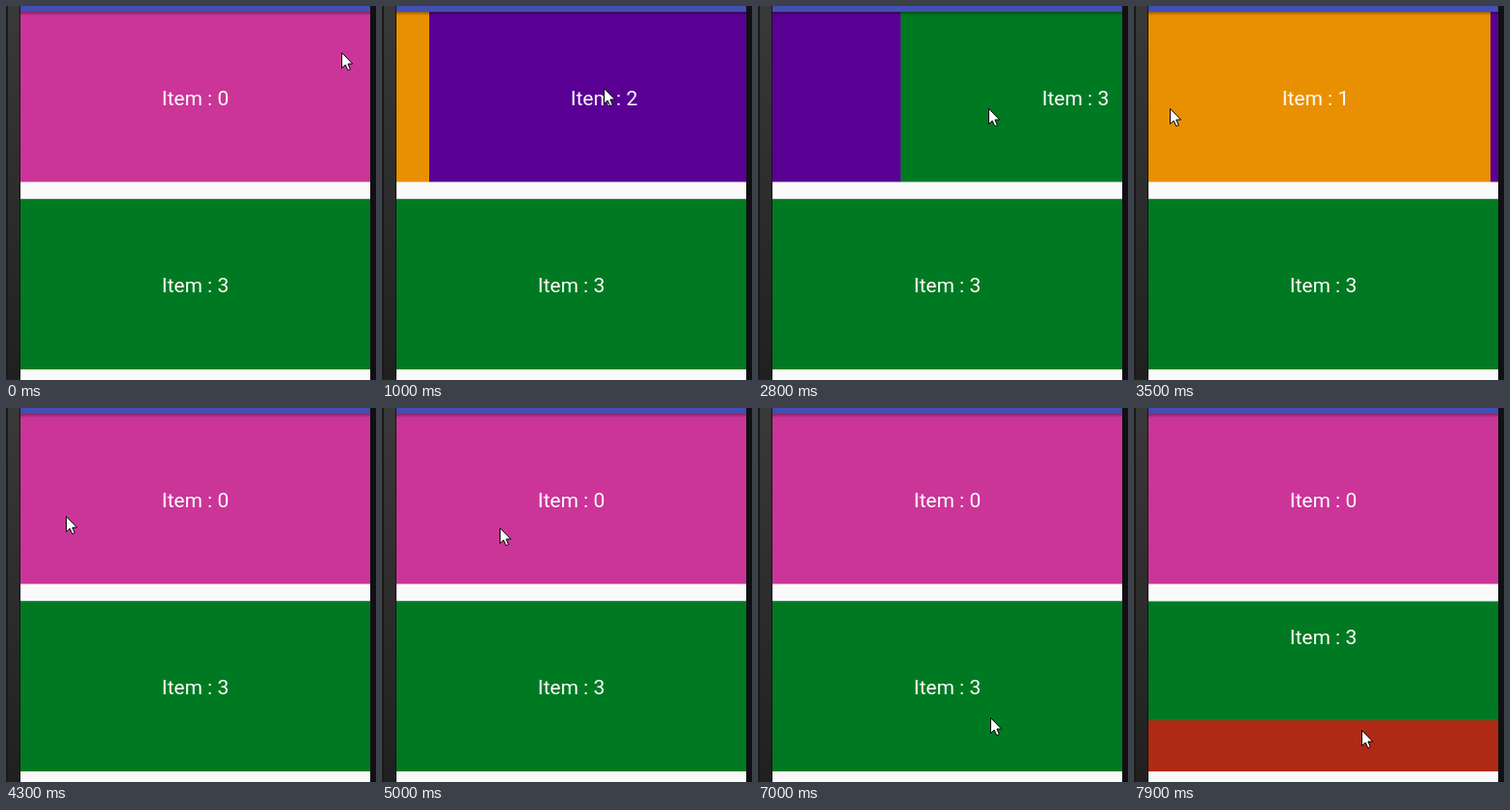
An HTML page with a canvas for the animation above (8 s loop, 384 by 388 pixels).

```html
<!DOCTYPE html>
<html lang="en">
<head>
<meta charset="utf-8">
<title>Pager demo</title>
<style>
html, body { margin: 0; width: 100%; height: 100%; overflow: hidden; background: #fafafa; }
canvas { display: block; }
</style>
</head>
<body>
<canvas id="stage" width="384" height="388"></canvas>
<script>
const ctx = document.getElementById('stage').getContext('2d');
const LOOP = 8000, STEP = 100;
const LEFT = 15, WIDTH = 363, HEIGHT = 176.5;
const DRAG = 200, SETTLE = 300;
const COLORS = ['#cb3598', '#e99002', '#5a0094', '#007a22', '#b02a15'];

// A gesture drags the cursor between two points and turns a page by dir
const gesture = (at, dir, from, to) => ({ at, dir, from, to });
const repeat = make => Array.from({ length: 4 }, (_, i) => make(i));
const swipeX = (at, dir, y) => gesture(at, dir, [174 + 138 * dir, y], [174 - 138 * dir, y]);
const swipeY = (at, dir, x) => gesture(at, dir, [x, 272 + 75 * dir], [x, 272 - 85 * dir]);

const topSwipes = [
  ...repeat(i => swipeX(270 + 402 * i, 1, 72 + 13 * i)),
  ...repeat(i => swipeX(2200 + 453 * i, -1, 106))
];
const bottomSwipes = repeat(i => swipeY(5807 + 615 * i, i % 2 ? -1 : 1, 248 - 4 * i));
const gestures = [
  gesture(-2 * DRAG, 0, [348, 48], [348, 48]),
  ...topSwipes,
  gesture(4990, 0, [116, 124], [245, 126]),
  ...bottomSwipes
];

const mix = (a, b, k) => a.map((v, i) => Math.round(v + (b[i] - v) * k));
const smooth = k => k * k * (3 - 2 * k);

// The finger drags half a page, then the page eases into place
function turned(age) {
  if (age <= 0) return 0;
  if (age < DRAG) return age / DRAG / 2;
  return 1 - 0.5 * Math.max(0, 1 - (age - DRAG) / SETTLE) ** 3;
}

function pageAt(start, swipes, t) {
  return swipes.reduce((page, { at, dir }) => page + dir * turned(t - at), start);
}

// Drag, swing back to the start point, then glide to the next gesture
function cursorAt(t) {
  const i = gestures.findLastIndex(g => g.at <= t);
  const { at, from, to } = gestures[i], next = gestures[i + 1];
  const age = t - at;
  if (age < DRAG) return mix(from, to, age / DRAG);
  if (age < 2 * DRAG || !next) return mix(to, from, smooth(age / DRAG - 1));
  return mix(from, next.from, (age - 2 * DRAG) / (next.at - at - 2 * DRAG));
}

function rect(fill, x, y, w, h) {
  ctx.fillStyle = fill;
  ctx.fillRect(x, y, w, h);
}

function shade(y0, y1, from, to) {
  const g = ctx.createLinearGradient(0, y0, 0, y1);
  g.addColorStop(0, from);
  g.addColorStop(1, to);
  return g;
}

function drawPager(top, page, vertical) {
  ctx.save();
  ctx.beginPath();
  ctx.rect(LEFT, top, WIDTH, HEIGHT);
  ctx.clip();
  ctx.font = '21px Roboto, sans-serif';
  ctx.textAlign = 'center';
  COLORS.forEach((color, i) => {
    const x = LEFT + (vertical ? 0 : Math.round((i - page) * WIDTH));
    const y = top + (vertical ? (i - page) * HEIGHT : 0);
    rect(color, x, Math.floor(y), WIDTH, HEIGHT + 1.5);
    ctx.fillStyle = '#fff';
    ctx.fillText('Item : ' + i, x + WIDTH / 2, Math.round(y + 96.6));
  });
  ctx.restore();
}

function drawFrame() {
  rect(shade(0, 388, '#393939', '#202020'), 0, 0, LEFT, 388);
  rect('#1a1a1a', 0, 0, 2, 388);
  rect('#161616', 14, 0, 1, 388);
  rect('#101014', 378, 0, 6, 388);
}

const arrow = new Path2D('M.5 .5V16.5L4.2 13L6.8 18.7L9.4 17.5L6.9 12H11.7Z');

function drawCursor([x, y]) {
  ctx.save();
  ctx.translate(x, y);
  ctx.fillStyle = '#fff';
  ctx.strokeStyle = '#000';
  ctx.fill(arrow);
  ctx.stroke(arrow);
  ctx.restore();
}

function draw(t) {
  rect('#fafafa', 0, 0, 384, 388);
  drawPager(6, pageAt(0, topSwipes, t), false);
  drawPager(200.5, pageAt(3, bottomSwipes, t), true);
  rect('#434fb2', LEFT, 0, WIDTH, 6);
  rect(shade(6, 10, 'rgba(0,0,0,.35)', 'rgba(0,0,0,0)'), LEFT, 6, WIDTH, 4);
  drawFrame();
  drawCursor(cursorAt(t));
}

const begin = performance.now();
function tick() {
  const t = (performance.now() - begin) % LOOP;
  draw(Math.floor(t / STEP) * STEP);
  requestAnimationFrame(tick);
}
tick();
</script>
</body>
</html>
```
